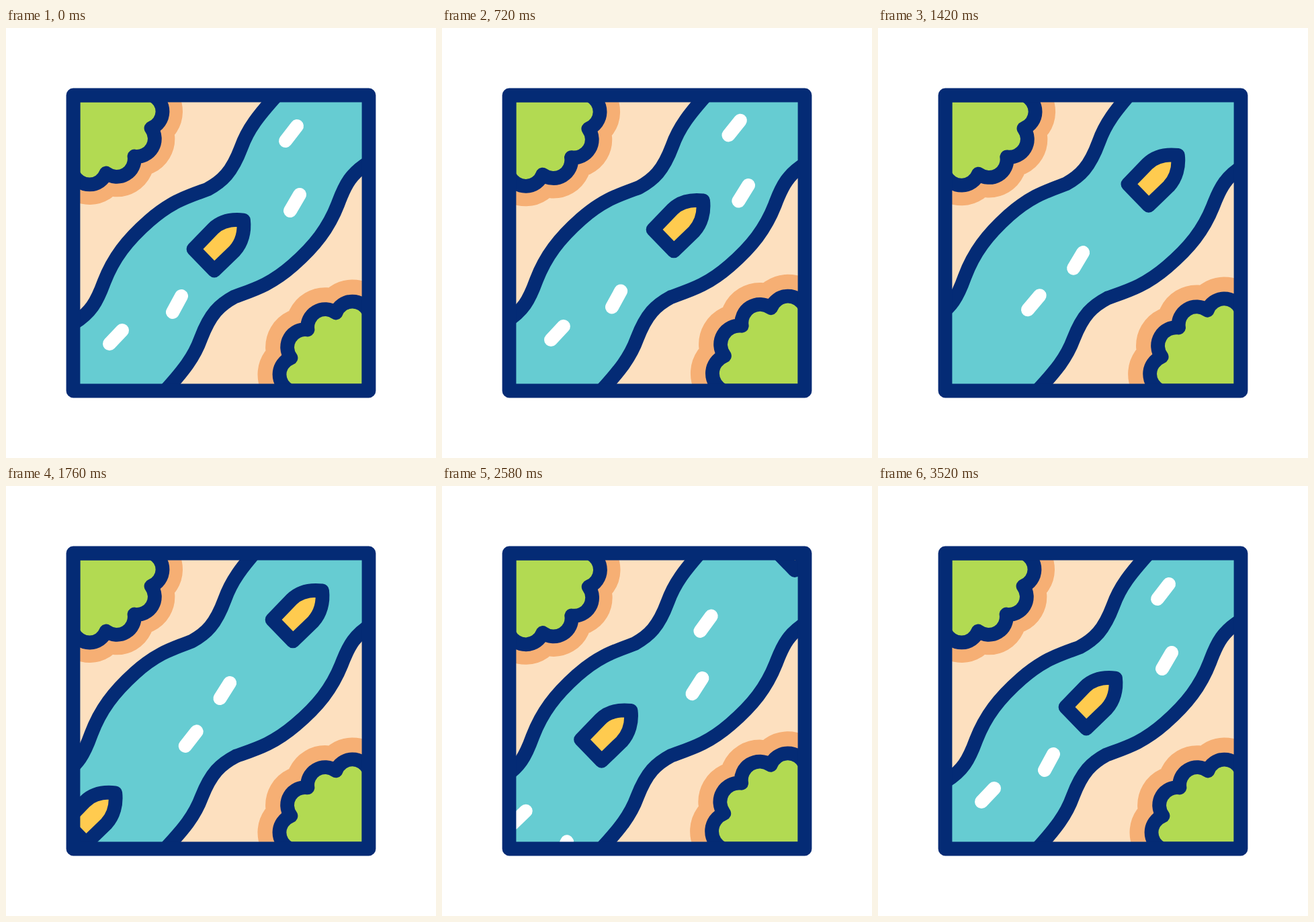
An HTML page that plays this animation: 640 px wide and 640 px high, repeating every 3600 ms.

```html
<!DOCTYPE html>
<html lang="en">
<head>
<meta charset="utf-8">
<title>River boat</title>
<style>
  html, body { margin: 0; width: 100%; height: 100%; overflow: hidden; background: #fff; }
  svg { display: block; width: 100vw; height: 100vh; }
  .line { stroke: #042b75; stroke-width: 20.8; stroke-linejoin: round; stroke-linecap: round; }
  .shade { fill: #f6af74; stroke: #f6af74; stroke-linejoin: round; }
  .bush { fill: #b2da52; }
  .boat { fill: #ffcb4f; }
  .dash { stroke: #fff; stroke-width: 20; stroke-linecap: round; }
</style>
</head>
<body>
<svg viewBox="0 0 640 640">
  <defs><clipPath id="box"><rect x="100" y="100" width="440" height="440"/></clipPath></defs>
  <g clip-path="url(#box)">
    <rect x="100" y="100" width="440" height="440" fill="#fde0bf"/>
    <path id="shadeA" class="shade" stroke-width="60"/>
    <path id="shadeB" class="shade" stroke-width="65"/>
    <path id="bushA" class="bush line"/>
    <path id="bushB" class="bush line"/>
    <path id="water" fill="#66ccd2"/>
    <g id="dashes"></g>
    <path id="bankA" class="line" fill="none"/>
    <path id="bankB" class="line" fill="none"/>
    <g id="boats"></g>
  </g>
  <rect class="line" x="100" y="100" width="440" height="440" fill="none"/>
</svg>
<script>
const LOOP = 3600, START = 100, END = 3520;
const $ = id => document.getElementById(id);
const clamp = v => Math.min(1, Math.max(0, v));
const wave = u => (1 - Math.cos(2 * Math.PI * u)) / 2;
const mix = (a, b, p) => a.map((v, i) => v + (b[i] - v) * p);
const turn = p => p.map(v => 640 - v);
// Maps a flat list of x, y pairs.
const warp = (p, fx, fy) => p.map((v, i) => i % 2 ? fy(v) : fx(v));

// Left bank as cubic segments; the right one is the same curve turned half round.
const leftBank = [403,100, 376,130, 360,150, 350,178, 336,215, 322,228, 300,240,
  270,251, 246,258, 213,287, 180,316, 160,342, 146,378, 135,408, 126,424, 100,440];
const rightBank = turn(leftBank);
const curve = p => `${p[0]},${p[1]}C${p.slice(2).join(" ")}`;

function drawRiver(p) {
  const a = curve(warp(leftBank, x => x - p * (15.4 + .026 * x), y => y - 9 * p));
  const b = curve(warp(rightBank, x => x + p * .02 * (x - 237), y => y + p * .015 * (540 - y)));
  $("bankA").setAttribute("d", "M" + a);
  $("bankB").setAttribute("d", "M" + b);
  $("water").setAttribute("d", `M${a}L100,540L${b}L540,100Z`);
}

// Points where the round bumps of a bush meet.
const notches = [217,100, 216,149, 191,191, 149,216, 100,217];

function drawBush(name, points, corner, sx, sy) {
  const p = warp(points, x => corner + (x - corner) * sx, y => corner + (y - corner) * sy);
  let d = `M${p[0]},${p[1]}`;
  for (let i = 2; i < p.length; i += 2) {
    const chord = Math.hypot(p[i] - p[i - 2], p[i + 1] - p[i - 1]);
    const r = Math.max(26, chord * .54);
    d += `A${r},${r} 0 0 1 ${p[i]},${p[i + 1]}`;
  }
  d += `L${corner},${corner}Z`;
  $("bush" + name).setAttribute("d", d);
  $("shade" + name).setAttribute("d", d);
}

// Wave marks move between stops: centre and half length.
const far = [424.5, 157, 8.5, -11], farLow = [430, 260, 7, -12];
const near = [254.5, 411, 6.5, -12], nearLow = [163.5, 460, 9.5, -10];
const trips = [
  [[-138, 1107, 0, -14], near], [[-96, 637, 12, -8], nearLow],
  [near, far], [nearLow, farLow],
  [far, [781, -126, 16, -7]], [farLow, [1054, -213, 18, -4]]
];

function drawDash(el, [x, y, hx, hy]) {
  el.setAttribute("d", `M${x - hx},${y - hy}L${x + hx},${y + hy}`);
}

// Way points of the leaving and the arriving boat: time, x, y.
const boatShape = "M279,329L310,361L340,332C351,320 355.5,303 353.5,286C336,284 320,287 308,299Z";
const courses = [
  [[START, 0, 0], [720, 35, -29], [1080, 68, -63], [1760, 117, -130], [2260, 157, -177], [2850, 270, -290]],
  [[1300, -300, 290], [1760, -191, 171], [2260, -111, 82], [2900, -41, 25], [END, 0, 0]]
];

// Smooth path through way points, at rest in the middle of the river.
function along(keys, t) {
  const last = keys.length - 1;
  t = Math.min(keys[last][0], Math.max(keys[0][0], t));
  const slope = (i, c) => {
    const a = keys[Math.max(i - 1, 0)], b = keys[Math.min(i + 1, last)];
    return keys[i][c] ? (b[c] - a[c]) / (b[0] - a[0]) : 0;
  };
  let i = 0;
  while (i < last - 1 && t > keys[i + 1][0]) i++;
  const a = keys[i], b = keys[i + 1], h = b[0] - a[0];
  const u = (t - a[0]) / h, v = 1 - u;
  return [1, 2].map(c => a[c] * (1 + 2 * u) * v * v + b[c] * (1 + 2 * v) * u * u
    + h * u * v * (slope(i, c) * v - slope(i + 1, c) * u));
}

function add(parent, cls) {
  const el = document.createElementNS("http://www.w3.org/2000/svg", "path");
  el.setAttribute("class", cls);
  return $(parent).appendChild(el);
}
const dashes = trips.map(() => add("dashes", "dash"));
const boats = courses.map(() => add("boats", "boat line"));
boats.forEach(b => b.setAttribute("d", boatShape));

function draw(t) {
  const u = clamp((t - START) / (END - START));
  const swell = wave(2 * u);
  const flow = wave(clamp((t - 380) / 3080) / 2);
  drawRiver(wave(u));
  drawBush("A", notches, 100, 1 + .019 * swell, 1 + .022 * swell);
  drawBush("B", turn(notches), 540, 1 + .037 * swell, 1 + .076 * swell);
  dashes.forEach((el, i) => drawDash(el, mix(trips[i][0], trips[i][1], flow)));
  boats.forEach((el, i) => el.setAttribute("transform", `translate(${along(courses[i], t)})`));
}

const t0 = performance.now();
function tick() {
  draw((performance.now() - t0) % LOOP);
  requestAnimationFrame(tick);
}
tick();
</script>
</body>
</html>
```
